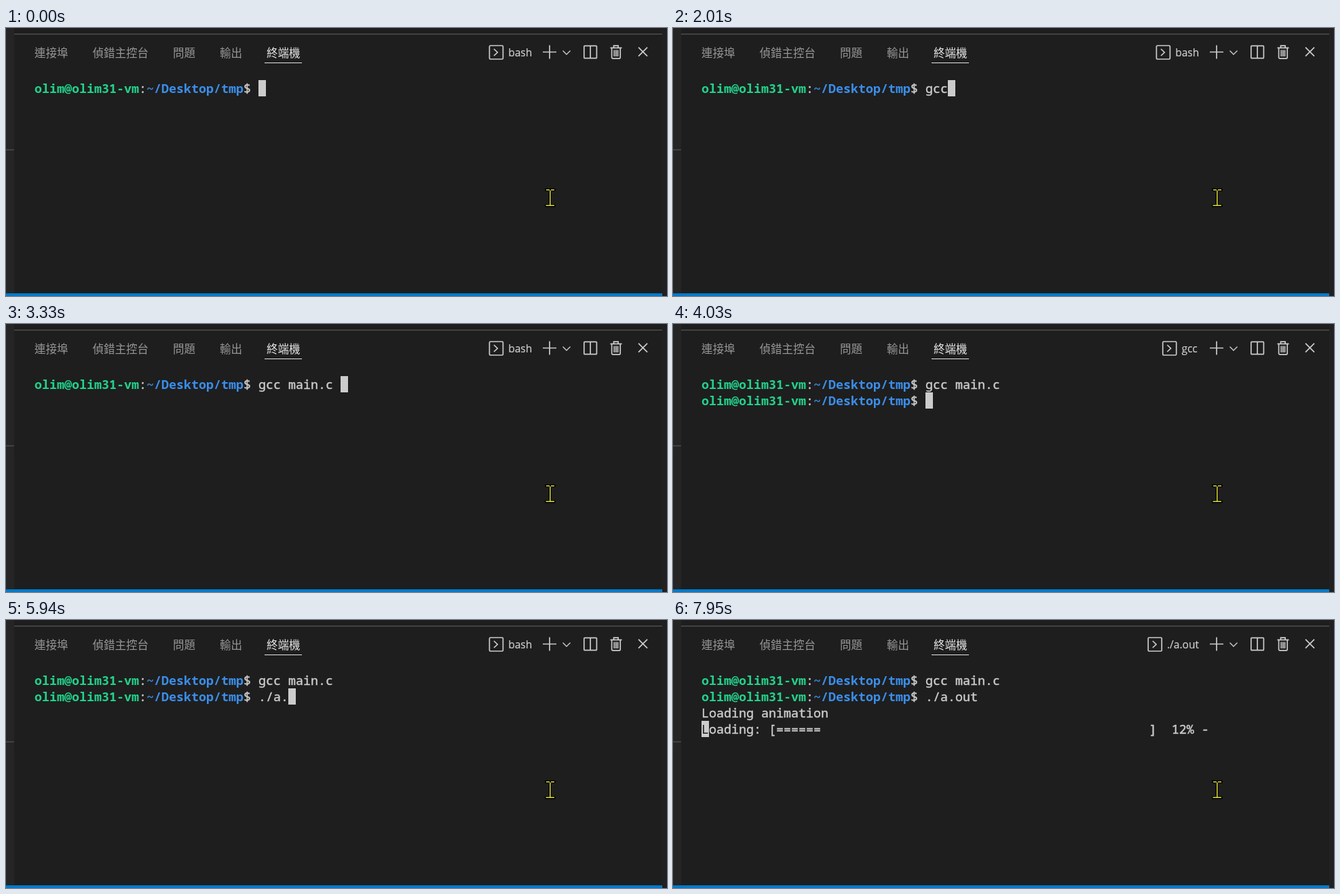
Animation of 974 by 396 pixels, one loop 8000 ms. Source, as an HTML page:

```html
<!DOCTYPE html>
<html lang="zh-Hant">
<head>
<meta charset="utf-8">
<title>Terminal</title>
<style>
  html, body { margin: 0; width: 100%; height: 100%; overflow: hidden; background: #1e1e1e; }
  svg { display: block; width: 974px; height: 396px; }
  text { white-space: pre; }
  .tabs { font: 16.5px "Noto Sans CJK TC", "Noto Sans CJK JP", "Noto Sans CJK", sans-serif; fill: #969696; }
  .tabs .active { fill: #e7e7e7; }
  .label { font: 15.5px "Open Sans", "Noto Sans", sans-serif; fill: #cccccc; stroke: #cccccc; stroke-width: .2; }
  .term { font: 18.333px "Noto Sans Mono", "DejaVu Sans Mono", monospace; fill: #cccccc; font-variant-ligatures: none; }
  .plain { stroke: #cccccc; stroke-width: .45; }
  .user { fill: #23d18b; font-weight: 700; }
  .path { fill: #3b8eea; font-weight: 700; }
  .under { fill: #1e1e1e; }
  .icon { fill: none; stroke: #cccccc; stroke-width: 1.7; }
</style>
</head>
<body>
<svg viewBox="0 0 974 396">
  <rect width="974" height="396" fill="#1e1e1e"/>
  <rect width="12" height="392" fill="#252526"/>
  <rect y="179" width="12" height="2" fill="#414142"/>
  <rect x="12" y="8" width="955" height="2" fill="#414141"/>
  <rect x="967" width="7" height="396" fill="#202022"/>
  <rect y="392" width="967" height="4" fill="#007acc"/>

  <g class="tabs">
    <text x="42" y="43">連接埠</text>
    <text x="127.5" y="43">偵錯主控台</text>
    <text x="246" y="43">問題</text>
    <text x="315" y="43">輸出</text>
    <text x="384" y="43" class="active">終端機</text>
  </g>
  <rect x="381" y="51" width="55" height="1" fill="#e7e7e7"/>

  <g id="process">
    <rect class="icon" x=".9" y="26" width="20" height="20" rx="1.5"/>
    <path class="icon" d="M7.5 31l5.2 5-5.2 5"/>
    <text id="label" class="label" x="28.7" y="41.7"></text>
  </g>

  <g class="icon">
    <path d="M791 35.5h20M801 25.5v20"/>
    <path d="M820.5 33.5l5.5 5.5 5.5-5.5" stroke-width="1.4"/>
    <rect x="851.8" y="26.3" width="18.6" height="18.4" rx="1"/>
    <path d="M861.1 26.3v18.4"/>
    <path d="M890.5 29.3h17M895.5 29v-2.8h6.6v2.8M892.6 29.5v14a1.6 1.6 0 0 0 1.6 1.6h9.4a1.6 1.6 0 0 0 1.6-1.6v-14M896.3 32.5v9.5M898.9 32.5v9.5M901.5 32.5v9.5"/>
    <path d="M932 28.7l13 13M945 28.7l-13 13"/>
  </g>

  <g id="term" class="term"></g>

  <g fill="none">
    <path d="M794 239h15.5M801.8 238v25M794 262.5h15.5" stroke="#000" stroke-width="4"/>
    <path d="M796 239.2h5M803 239.2h5M801.8 240v22M795.5 262.3h12.5" stroke="#e0e040" stroke-width="1.5"/>
  </g>
</svg>
<script>
const LOOP = 8000, LEFT = 42, TOP = 77, CELL = 11, ROW = 24;
const USER = "olim@olim31-vm", PATH = "~/Desktop/tmp";
const PROMPT_COLS = USER.length + PATH.length + 3;
const COMPILED = 4030, RUN = 7540;

// [time, typed text]; a shorter text is a backspace, a longer jump a completion
const compile = [
  [0, ""], [100, "g"], [600, ""], [1610, "g"], [1810, "gc"], [2010, "gcc"],
  [2210, "gcc "], [2410, "gcc m"], [2530, "gcc ma"], [2630, "gcc mai"],
  [2730, "gcc main"], [3030, "gcc main."], [3330, "gcc main.c "]
];
const run = [
  [COMPILED, ""], [5040, "./"], [5330, "./a"], [5940, "./a."],
  [6540, "./a"], [6740, "./a.out "]
];
const labels = [[0, "bash"], [COMPILED, "gcc"], [4220, "bash"], [RUN, "./a.out"]];
const iconX = { bash: 711.5, gcc: 720.8, "./a.out": 699.3 };

const term = document.getElementById("term");
const label = document.getElementById("label");
const processBox = document.getElementById("process");

const latest = (steps, t) => steps.filter(([at]) => at <= t).pop()[1];

const text = (col, row, str, cls = "plain") =>
  `<text class="${cls}" x="${LEFT + col * CELL}" y="${TOP + row * ROW + 19}">${str}</text>`;

const cursor = (col, row) =>
  `<rect x="${LEFT + col * CELL}" y="${TOP + row * ROW}" width="${CELL}" height="${ROW}"/>`;

const prompt = (row, typed) =>
  text(0, row, USER, "user") +
  text(USER.length, row, ":") +
  text(USER.length + 1, row, PATH, "path") +
  text(PROMPT_COLS - 2, row, "$") +
  text(PROMPT_COLS, row, typed);

function progress(row, percent) {
  const bar = "=".repeat(percent / 2).padEnd(50);
  const spinner = "-\\|/"[percent % 4];
  return cursor(0, row) + text(0, row, "L", "under") +
    text(1, row, `oading: [${bar}] ${String(percent).padStart(3)}% ${spinner}`);
}

function screen(t) {
  const first = latest(compile, t);
  let out = prompt(0, first);
  if (t < COMPILED) return out + cursor(PROMPT_COLS + first.length, 0);
  const second = latest(run, t);
  out += prompt(1, second);
  if (t < RUN) return out + cursor(PROMPT_COLS + second.length, 1);
  const percent = 3 * Math.floor((t - RUN) / 102.5);
  return out + text(0, 2, "Loading animation") + progress(3, percent);
}

let shown = "";
function draw(t) {
  const name = latest(labels, t);
  label.textContent = name;
  processBox.setAttribute("transform", `translate(${iconX[name]} 0)`);
  const next = screen(t);
  if (next !== shown) term.innerHTML = shown = next;
}

const start = performance.now();
function tick() {
  draw((performance.now() - start) % LOOP);
  requestAnimationFrame(tick);
}
tick();
</script>
</body>
</html>
```
